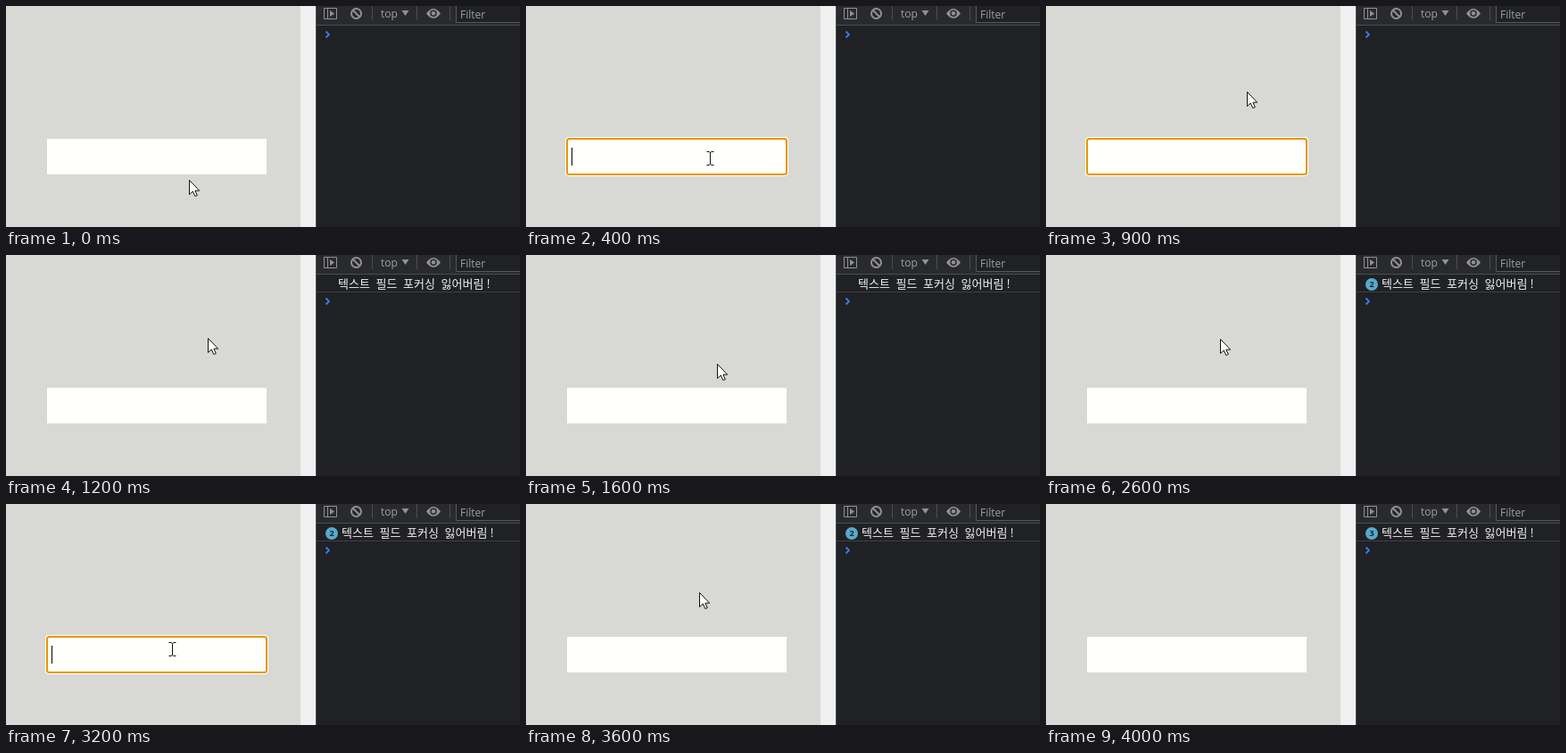
Animation of 576x248 px, one loop 4.7 s. Source, as an HTML page:

```html
<!DOCTYPE html>
<html lang="ko">
<head>
<meta charset="utf-8">
<title>Blur event demo</title>
<style>
  html, body { margin: 0; width: 100%; height: 100%; overflow: hidden; background: #d8d9d4; }
  svg { display: block; }
  .ui { font: 12px "Open Sans", "Noto Sans", sans-serif; fill: #9aa0a6; }
  .log { font: 13px "Noto Sans CJK KR", "Noto Sans CJK", sans-serif; word-spacing: 3px; fill: #f0f0f0; }
  .digit { font: bold 9px "Open Sans", sans-serif; fill: #202124; text-anchor: middle; }
  .icon { fill: none; stroke: #919191; }
</style>
</head>
<body>
<svg width="576" height="248" viewBox="0 0 576 248">
  <!-- page -->
  <rect width="330" height="248" fill="#d8d9d4"/>
  <rect x="330" width="17" height="248" fill="#f0f0f1"/>
  <rect x="46" y="149" width="246" height="40" fill="#fffffc"/>
  <g id="ring">
    <rect x="44" y="147" width="250" height="44" rx="4" fill="#fffffc"/>
    <rect x="46" y="149" width="246" height="40" rx="2.5" fill="#fffffc" stroke="#e59700" stroke-width="2"/>
  </g>
  <rect id="caret" x="51" y="159" width="1" height="20"/>

  <!-- console -->
  <rect x="347" width="229" height="248" fill="#202124"/>
  <rect x="348" width="228" height="21" fill="#292a2d"/>
  <path d="M347.5 0V248M348 21.5H576M410.5 0V16M460.5 0V16M497.5 0V16" stroke="#494c50"/>
  <path d="M504.5 0V18.5H576" fill="#202124" stroke="#55585c"/>
  <rect x="505" width="71" height="18" fill="#202124"/>
  <g class="icon">
    <path d="M356.5 2.5H370.5V14.5H356.5ZM360.5 2.5V14.5"/>
    <path d="M363 5V12L368 8.5Z" fill="#919191" stroke="none"/>
    <circle cx="392.5" cy="8.5" r="5.5" stroke-width="2"/>
    <path d="M388.5 4.5L396.5 12.5" stroke-width="2"/>
    <path d="M443.500 5H451.500L447.500 11Z" fill="#919191" stroke="none"/>
    <path d="M471 8.500Q479 -2.500 487 8.500Q479 19 471 8.500Z" fill="#919191" stroke="none"/>
    <circle cx="479" cy="8.200" r="3" fill="#919191" stroke="#292a2d" stroke-width="1.500"/>
  </g>
  <text class="ui" x="420" y="13">top</text>
  <text class="ui" x="509" y="14">Filter</text>

  <g id="entry">
    <path d="M348 41.500H576" stroke="#3c3f43"/>
    <text id="message" class="log" y="37">텍스트 필드 포커싱 잃어버림<tspan dx="3">!</tspan></text>
    <g id="badge">
      <circle cx="365" cy="33" r="7" fill="#58a9cc"/>
      <text id="digit" class="digit" x="365" y="36.400"></text>
    </g>
  </g>
  <path id="prompt" d="M358.500 28.500L362 32L358.500 35.500" fill="none" stroke="#367cf1" stroke-width="1.800"/>

  <!-- pointers -->
  <path id="arrow" d="M.5 .5V16.500L4.300 13L6.800 18.500L9.300 17.500L6.900 12.200H11.700Z" fill="#fff" stroke="#111"/>
  <path id="beam" d="M-3.500 -7.500H-1L.5 -6.500L2 -7.500H4.500M.5 -6.500V6.500M-3.500 7.500H-1L.5 6.500L2 7.500H4.500" fill="none" stroke="#111"/>
</svg>
<script>
const LOOP = 4700, BLINK = 500;
const el = id => document.getElementById(id);
const show = (id, on) => el(id).style.display = on ? '' : 'none';

// Pointer poses: start time, x, y, shape
const poses = [
  [0, 205, 195, 'arrow'], [100, 205, 187, 'arrow'], [200, 205, 176, 'beam'],
  [300, 206, 171, 'beam'], [500, 207, 170, 'beam'], [700, 210, 158, 'beam'],
  [800, 220, 118, 'arrow'], [900, 225, 96, 'arrow'], [1000, 226, 93, 'arrow'],
  [1600, 214, 122, 'arrow'], [1700, 203, 156, 'beam'], [1800, 198, 167, 'beam'],
  [2000, 197, 168, 'beam'], [2300, 194, 104, 'arrow'], [2400, 194, 97, 'arrow'],
  [2500, 195, 94, 'arrow'], [2900, 193, 112, 'arrow'], [3000, 189, 142, 'arrow'],
  [3100, 186, 160, 'beam'], [3200, 186, 163, 'beam'], [3500, 189, 136, 'arrow'],
  [3600, 194, 99, 'arrow'], [3700, 195, 86, 'arrow'], [3900, 204, 72, 'arrow'],
  [4000, 0, 0, 'none']
];
const focusSpans = [[400, 1000], [1900, 2500], [3200, 3600]];
const logTimes = [1200, 2600, 3700];

function draw(t) {
  const [, x, y, shape] = poses.findLast(pose => pose[0] <= t);
  for (const id of ['arrow', 'beam']) {
    show(id, id === shape);
    el(id).setAttribute('transform', `translate(${x} ${y})`);
  }

  const focus = focusSpans.find(([from, to]) => t >= from && t < to);
  show('ring', focus);
  show('caret', focus && (t - focus[0]) % (2 * BLINK) < BLINK);

  const count = logTimes.filter(time => time <= t).length;
  show('entry', count > 0);
  show('badge', count > 1);
  el('digit').textContent = count;
  el('message').setAttribute('x', count > 1 ? 376 : 372);
  el('prompt').setAttribute('transform', `translate(0 ${count ? 20 : 0})`);
}

const start = performance.now();
function tick() {
  draw((performance.now() - start) % LOOP);
  requestAnimationFrame(tick);
}
tick();
</script>
</body>
</html>
```
